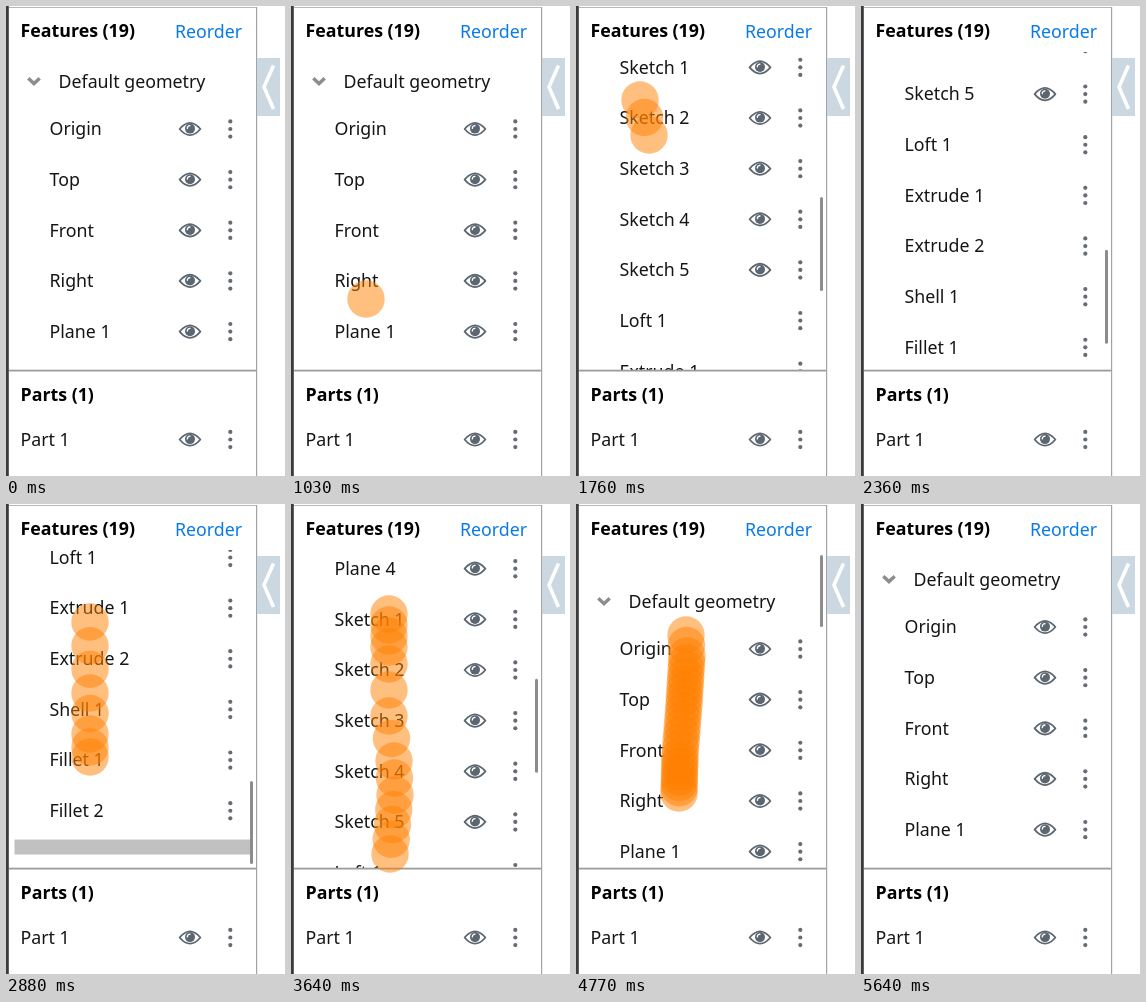
An HTML page that plays this animation: 279x470 px, repeating every 6.08 s.

```html
<!DOCTYPE html>
<html lang="en">
<head>
<meta charset="utf-8">
<title>Scrolling feature list</title>
<style>
  html, body { margin: 0; width: 100%; height: 100%; overflow: hidden; background: #fff; }
  svg { display: block; width: 279px; height: 470px; }
  text { font: 17.8px "Noto Sans", "Open Sans", sans-serif; fill: #151515; white-space: pre; }
  .bold { font-weight: 700; fill: #000; }
  .link { fill: #0a7be6; }
</style>
</head>
<body>
<svg viewBox="0 0 279 470">
  <defs>
    <clipPath id="view"><rect x="3" y="46" width="246" height="318"/></clipPath>
    <g id="eye">
      <path d="M-10.4 0Q0 -12.4 10.4 0Q0 12.4 -10.4 0Z" fill="#fff" stroke="#5c6670" stroke-width="1.8" stroke-linejoin="round"/>
      <circle cy="-.4" r="5" fill="#5c6670"/>
      <path d="M-2.7 -.6A2.8 2.8 0 0 1 0 -3.3" fill="none" stroke="#fff" stroke-width="1.3" stroke-linecap="round"/>
    </g>
    <g id="dots" fill="#666c73">
      <circle cy="-7.6" r="2.1"/><circle r="2.1"/><circle cy="7.6" r="2.1"/>
    </g>
  </defs>

  <rect width="279" height="470" fill="#fff"/>
  <g clip-path="url(#view)">
    <g id="list">
      <path d="M22.3 72.2L28 77.6L33.7 72.2" fill="none" stroke="#8d8d8d" stroke-width="3.4"/>
      <text x="52.5" y="81.5">Default geometry</text>
      <rect x="8.5" y="1063.5" width="237" height="15" fill="#c1c1c1"/>
    </g>
    <rect id="thumb" x="244" width="3" rx="1.5" fill="#8c8c8f"/>
  </g>

  <text class="bold" x="14.5" y="31">Features (19)</text>
  <text class="link" x="169" y="32">Reorder</text>
  <text class="bold" x="14.5" y="394.5">Parts (1)</text>
  <text x="14.5" y="440.3">Part 1</text>
  <use href="#eye" x="184" y="433.5"/>
  <use href="#dots" x="224.3" y="433.5"/>

  <rect y="0" width="2.8" height="470" fill="#3b3b3e"/>
  <rect x="3" y="1" width="248" height="1" fill="#b4b8bc"/>
  <rect x="3" y="363.7" width="248" height="1.8" fill="#9c9c9c"/>
  <rect x="250" y="1" width="1.2" height="469" fill="#a3a3a3"/>
  <rect x="251" y="52" width="23" height="58" fill="#cbd7e1"/>
  <path d="M267.5 59.5L258 81L267.5 103" fill="none" stroke="#fff" stroke-width="3.6"/>
  <g id="trail" fill="#ff8000" fill-opacity=".5"></g>
</svg>
<script>
const NS = 'http://www.w3.org/2000/svg';
const $ = id => document.getElementById(id);
const list = $('list'), thumb = $('thumb'), trail = $('trail');

function add(parent, tag, attrs, text) {
  const el = document.createElementNS(NS, tag);
  for (const k in attrs) el.setAttribute(k, attrs[k]);
  if (text) el.textContent = text;
  parent.appendChild(el);
  return el;
}

const ROW = 50.65, FIRST = 123, EYES = 13;
const names = ['Origin', 'Top', 'Front', 'Right'];
const series = [['Plane', 4], ['Sketch', 5], ['Loft', 1], ['Extrude', 2], ['Shell', 1], ['Fillet', 2]];
for (const [word, count] of series)
  for (let i = 1; i <= count; i++) names.push(word + ' ' + i);

names.forEach((name, i) => {
  const y = FIRST + i * ROW;
  add(list, 'text', { x: 43.5, y: y + 6.3 }, name);
  if (i < EYES) add(list, 'use', { href: '#eye', x: 184, y });
  add(list, 'use', { href: '#dots', x: 224.3, y });
});

// Swipes: start time and [sample, x, y] points of the finger
const LOOP = 6080, START = 1030, STEP = 59.3, SAMPLE = 16.7, LIFE = 400, R = 18.7;
const swipes = [
  { t: 1030, pts: [[0, 75, 293], [6, 76, 278], [13, 79, 215], [19, 73, 129], [21, 64, 94]] },
  { t: 2500, pts: [[0, 84, 253], [1, 84, 243], [2, 84, 230], [4, 84, 189], [7, 84, 118]] },
  { t: 3322, pts: [[0, 98, 110], [3, 98, 143], [4, 98, 160], [6, 98, 212], [8, 103, 257], [10, 104, 291], [14, 99, 350]] },
  { t: 4372, pts: [[0, 110, 131], [2, 111, 152], [9, 108, 200], [16, 104, 252], [23, 103, 289], [25, 103, 290]] },
  { t: 5010, pts: [[0, 83, 42], [1, 83, 49], [3, 82, 80], [10, 80, 265]] }
];
for (const s of swipes) {
  s.last = s.pts[s.pts.length - 1][0];
  s.end = s.t + s.last * SAMPLE;
}

function finger({ pts, last }, n) {
  n = Math.min(n, last);
  const j = pts.findIndex((p, i) => i && n <= p[0]);
  const a = pts[j - 1], b = pts[j], u = (n - a[0]) / (b[0] - a[0]);
  return [a[1] + (b[1] - a[1]) * u, a[2] + (b[2] - a[2]) * u];
}

// Scroll physics
const MAX = 717, VIEW = 318, W = 0.014;
const band = x => 0.55 * x / (1 + 0.55 * x / VIEW);
const glide = (from, dist, tau, dt) => from + dist * (1 - Math.exp(-dt / tau));
const spring = (x, v, dt) => (x + (v + W * x) * dt) * Math.exp(-W * dt);
const soft = s => s < 0 ? -band(-s) : s > MAX ? MAX + band(s - MAX) : s;

function drag(s, from, t) {
  return soft(from + s.pts[0][2] - finger(s, (t - s.t) / SAMPLE)[1]);
}
const glide1 = t => glide(199, 521, 500, t - swipes[0].end);
const glide3 = t => glide(477, -479, 580, t - swipes[2].end);

function scrollAt(t) {
  const [a, b, c, d] = swipes;
  if (t < a.t) return 0;
  if (t < a.end) return drag(a, 0, t);
  if (t < b.t) return glide1(t);
  if (t < b.end) return drag(b, glide1(b.t), t);
  if (t < c.t) return MAX + spring(39.5, 0.76, t - b.end);
  if (t < c.end) return drag(c, MAX, t);
  if (t < d.t) return glide3(t);
  const from = glide3(d.t);
  if (t < d.end) return drag(d, from, t);
  return spring(drag(d, from, d.end), 0, t - d.end);
}

const pool = Array.from({ length: 30 }, () => add(trail, 'circle', { r: R }));

function drawTrail(t) {
  let used = 0;
  for (const s of swipes)
    for (let n = 0; n <= s.last; n++) {
      const age = t - s.t - n * SAMPLE;
      if (age < -0.01 || age > LIFE) continue;
      const [x, y] = finger(s, n), dot = pool[used++];
      dot.setAttribute('cx', x);
      dot.setAttribute('cy', y);
    }
  pool.forEach((dot, i) => dot.setAttribute('display', i < used ? 'inline' : 'none'));
}

function drawThumb(t, s) {
  const top = 51, len = 94, room = 215;
  const over = s < 0 ? -s : Math.max(0, s - MAX);
  const h = len - over;
  const y = s > MAX ? top + room + over : top + room * Math.max(0, s) / MAX;
  thumb.setAttribute('y', y);
  thumb.setAttribute('height', h);
  const fade = Math.max(0, Math.min(1, (5590 - t) / 160));
  thumb.setAttribute('opacity', t > START ? fade : 0);
}

function draw(now) {
  const k = Math.floor((now % LOOP - START + 5) / STEP);
  const t = k < 0 ? 0 : START + k * STEP;
  const s = scrollAt(t);
  list.setAttribute('transform', `translate(0 ${-s.toFixed(2)})`);
  drawThumb(t, s);
  drawTrail(t);
}

function tick() {
  draw(performance.now());
  requestAnimationFrame(tick);
}
tick();
</script>
</body>
</html>
```
